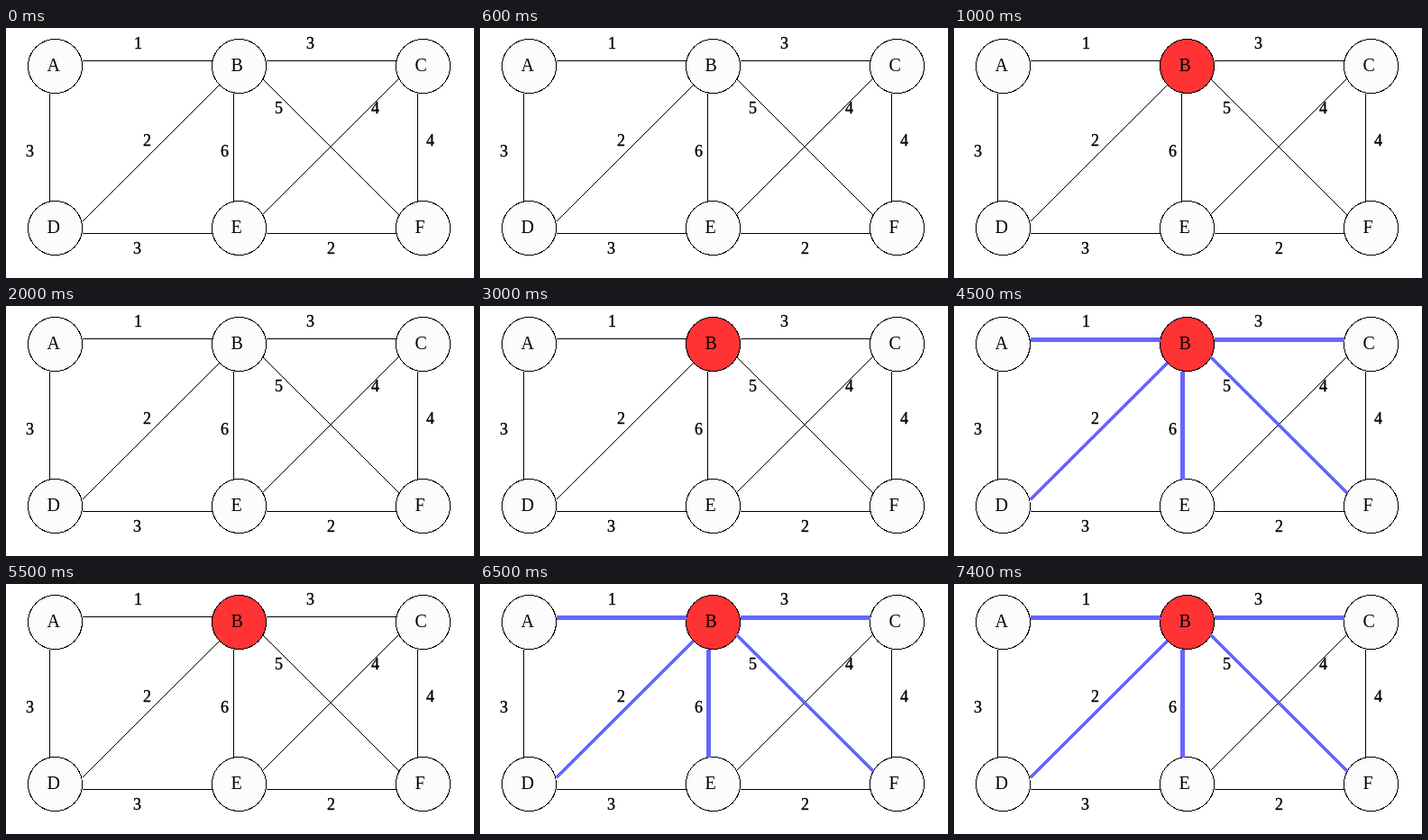
Recreate the animation shown at these times as an HTML page. Size 519 by 278 pixels, loop 8000 ms.

```html
<!DOCTYPE html>
<html lang="en">
<head>
<meta charset="utf-8">
<title>Weighted graph</title>
<style>
  html, body { margin: 0; width: 100%; height: 100%; overflow: hidden; background: #fff; }
  svg { display: block; }
  circle, line { shape-rendering: crispEdges; }
  text { font: 20px "Liberation Serif", "Times New Roman", serif; }
  .weight { font-size: 18px; text-anchor: middle; stroke: #000; stroke-width: 0.35; }
</style>
</head>
<body>
<svg id="stage" width="519" height="278" viewBox="0 0 519 278"></svg>
<script>
const LOOP = 8000;
const RADIUS = 30, INSET = 6, DIAGONAL = 76;
const PLAIN = "#fcfcfc", RED = "#ff3333", BLUE = "#6666ff";
const stage = document.getElementById("stage");

function add(tag, attrs, text) {
  const el = document.createElementNS("http://www.w3.org/2000/svg", tag);
  for (const key in attrs) el.setAttribute(key, attrs[key]);
  if (text) el.textContent = text;
  return stage.appendChild(el);
}

// Nodes sit on a grid of three columns and two rows.
const nodes = {};
[..."ABCDEF"].forEach((name, i) => {
  const cx = 54.5 + 204 * (i % 3), cy = 42.5 + 180 * Math.floor(i / 3);
  const disc = add("circle", { cx, cy, r: RADIUS, fill: PLAIN, stroke: "#000" });
  nodes[name] = { cx, cy, disc };
});

// Each edge: its two nodes, weight, and label offset from their midpoint.
const edges = [
  ["AD", 3, -28, 11], ["BE", 6, -16, 11], ["CF", 4, 8, -1],
  ["AB", 1, -10, -19], ["BC", 3, -23, -19],
  ["DE", 3, -11, 29], ["EF", 2, 0, 29],
  ["DB", 2, 0, -1], ["BF", 5, -58, -37], ["EC", 4, 49, -37]
];
// Small shifts of slanted edges off the midpoint.
const slides = { DB: [4, 7], EC: [-0.5, -0.5] };

function layout([ends, weight, labelX, labelY]) {
  const [a, b] = [...ends].map(name => nodes[name]);
  const dx = b.cx - a.cx, dy = b.cy - a.cy;
  const midX = (a.cx + b.cx) / 2, midY = (a.cy + b.cy) / 2;
  const slanted = dx !== 0 && dy !== 0;
  const half = slanted ? DIAGONAL : Math.hypot(dx, dy) / 2 - RADIUS;
  let [x, y] = slides[ends] || [0, 0];
  if (!dx) x = -INSET;
  if (!dy) y = midY < 139 ? -INSET : INSET;
  return {
    x: midX + x, y: midY + y, slanted, weight,
    spanX: Math.sign(dx) * half, spanY: Math.sign(dy) * half,
    labelX: midX + labelX, labelY: midY + labelY,
    meetsB: ends.includes("B")
  };
}

function line({ x, y, spanX, spanY }, stroke, width, nudgeX = 0, nudgeY = 0) {
  return add("line", {
    x1: x + nudgeX - spanX, y1: y + nudgeY - spanY,
    x2: x + nudgeX + spanX, y2: y + nudgeY + spanY,
    stroke, "stroke-width": width
  });
}

const links = edges.map(layout);
links.forEach(link => line(link, "#000", 1));

// The thick strokes lie one pixel right of or below the thin ones.
const thick = links.filter(link => link.meetsB).map(link => link.slanted
  ? line(link, BLUE, 4.2)
  : line(link, BLUE, 5, link.spanX ? 0 : 1, link.spanY ? 0 : 1));

for (const name in nodes) {
  const { cx, cy } = nodes[name];
  add("text", { x: cx - 9, y: cy + 5.5 }, name);
}
for (const { labelX, labelY, weight } of links)
  add("text", { x: labelX, y: labelY - 0.5, class: "weight" }, weight);

function draw(ms) {
  const t = ms % LOOP;
  const red = (t >= 1000 && t < 2000) || t >= 3000;
  const blue = (t >= 4500 && t < 5500) || t >= 6500;
  nodes.B.disc.setAttribute("fill", red ? RED : PLAIN);
  for (const el of thick) el.setAttribute("visibility", blue ? "visible" : "hidden");
}

const start = performance.now();
function tick() {
  draw(performance.now() - start);
  requestAnimationFrame(tick);
}
tick();
</script>
</body>
</html>
```
